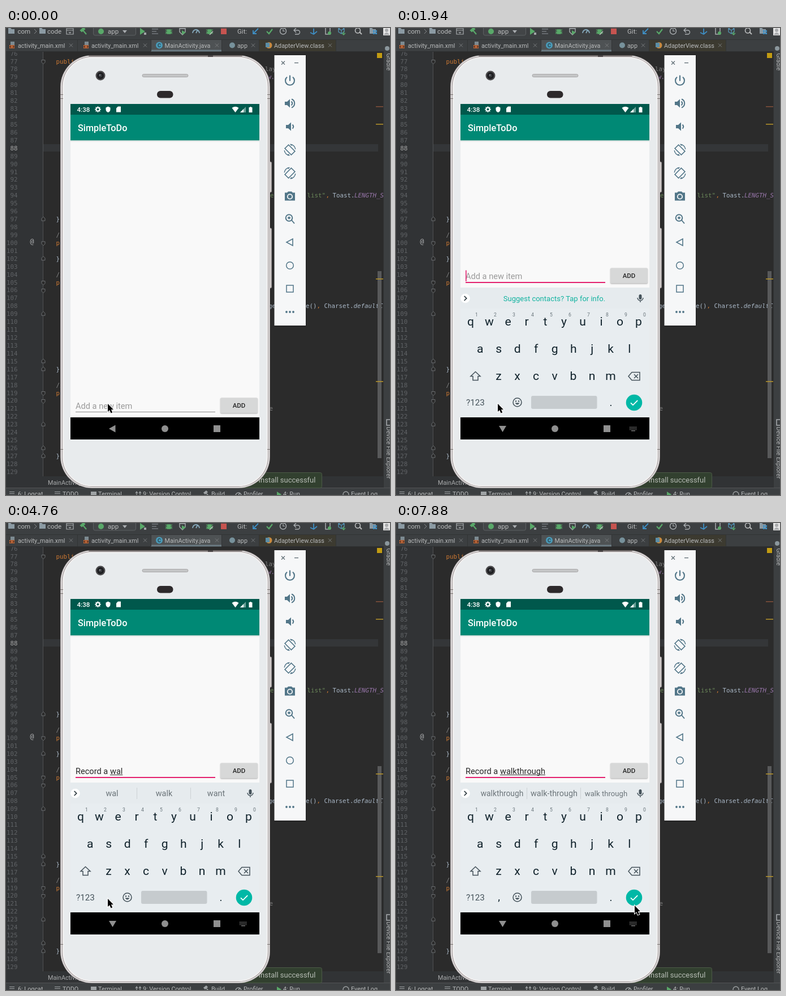
An HTML page with a canvas that plays this animation: 679x824 px, repeating every 8 s.

```html
<!DOCTYPE html>
<html lang="en">
<head>
<meta charset="utf-8">
<title>To-do app in an emulator</title>
<style>
html, body { margin: 0; width: 100%; height: 100%; overflow: hidden; background: #2b2b2b; }
canvas { display: block; }
</style>
</head>
<body>
<canvas id="stage" width="679" height="824"></canvas>
<script>
const W = 679, H = 824, LOOP = 8000;
const SANS = 'Roboto, sans-serif', MONO = '"DejaVu Sans Mono", monospace';
const PINK = '#e3226f', TEAL = '#00b8a6';
const stage = document.getElementById('stage').getContext('2d');
let g = stage;

// ---------- helpers ----------
function layer() {
  const c = document.createElement('canvas');
  c.width = W; c.height = H;
  return c.getContext('2d');
}
function onLayer(target, draw) {
  const prev = g;
  g = target;
  draw();
  g = prev;
}
function rect(x, y, w, h, color) {
  g.fillStyle = color;
  g.fillRect(x, y, w, h);
}
function round(x, y, w, h, r, fill, stroke, lw = 1) {
  g.beginPath();
  g.roundRect(x, y, w, h, r);
  if (fill) { g.fillStyle = fill; g.fill(); }
  if (stroke) { g.strokeStyle = stroke; g.lineWidth = lw; g.stroke(); }
}
function disc(x, y, r, fill, stroke, lw = 1) {
  g.beginPath();
  g.arc(x, y, r, 0, 7);
  if (fill) { g.fillStyle = fill; g.fill(); }
  if (stroke) { g.strokeStyle = stroke; g.lineWidth = lw; g.stroke(); }
}
// Path given relative to (x, y)
function shape(x, y, d, fill, stroke, lw = 1.5, turn = 0) {
  const p = new Path2D(d);
  g.save();
  g.translate(x, y);
  g.rotate(turn);
  if (fill) { g.fillStyle = fill; g.fill(p); }
  if (stroke) { g.strokeStyle = stroke; g.lineWidth = lw; g.stroke(p); }
  g.restore();
}
function text(s, x, y, size, color, align = 'left', style = '', family = SANS) {
  g.font = `${style} ${size}px ${family}`;
  g.textAlign = align;
  g.fillStyle = color;
  g.fillText(s, x, y);
}
function code(s, x, line, color, style = '') {
  text(s, x, lineY(line), 10.8, color, 'left', style, MONO);
}
const lineY = n => 62.5 + (n - 77) * 13.93;

// ---------- editor ----------
function drawEditor() {
  rect(0, 0, W, H, '#2b2b2b');
  rect(0, 41, 66, 750, '#313335');
  rect(66, 205, 592, 13, '#343638');
  rect(65, 41, 1, 750, '#505254');
  for (let n = 76; n <= 129; n++)
    text(n, 20.5, lineY(n), 10.8, n === 88 ? '#a9a9a9' : '#606366', 'right', '', MONO);
  text('@', 46, lineY(100) - 1.5, 11.6, '#b5b7b8', 'center', '', MONO);

  const opens = [77, 100, 105, 106, 119, 120], closes = [97, 102, 109, 115, 116, 123, 126, 127];
  for (const n of opens) shape(66, lineY(n) - 3, 'M-3-3H3V1L0 4L-3 1Z', '#2b2b2b', '#6b6e70', 1);
  for (const n of closes) shape(66, lineY(n) - 4, 'M-3 3H3V-1L0-4L-3-1Z', '#2b2b2b', '#6b6e70', 1);

  const plain = '#a9b7c6', key = '#cc7832', str = '#6a8759', field = '#9876aa';
  code('publi', 88.5, 77, key);
  for (const n of [97, 102, 116, 127]) code('}', 88.5, n, plain);
  for (const n of [99, 104, 118]) code('//', 88.5, n, '#808080');
  for (const n of [100, 105, 119]) code('p', 88.5, n, key);
  code('lay', 458, 78, '#808080');
  code('ew.', 456, 79, field, 'italic');
  code('e', 467, 94, str);
  code('list"', 532.5, 94, str);
  code(',', 565.5, 94, key);
  code('Toast.', 577.5, 94, plain);
  code('LENGTH_S', 616, 94, field, 'italic');
  code('ge', 464, 108, plain);
  code('e()', 530, 108, plain);
  code(',', 549.5, 108, key);
  code('Charset.', 562.5, 108, plain);
  code('defaultC', 614.5, 108, plain, 'italic');
  code('e', 465.5, 121, '#808080');

  rect(657, 429, 7, 330, '#58595a');
  rect(656, 44, 9, 9, '#c29b12');
  rect(654, 138, 13, 1.5, '#84513a');
  for (const y of [169, 442, 623]) rect(654, y, 13, 1.5, '#b8952a');
}

function drawTabs() {
  const ink = '#b9bbbc';
  rect(0, 0, W, 41, '#3c3f41');
  rect(0, 20, W, 1, '#323435');
  rect(256, 21, 125, 20, '#4e5254');
  rect(447, 21, 136, 20, '#3c3a30');
  rect(0, 41, W, 1, '#2e3031');
  rect(256, 38.5, 125, 3, '#6a7a82');
  const tabs = [['activity_main.xml', 21, 115], ['activity_main.xml', 151, 246], ['MainActivity.java', 280.5, 373],
    ['app', 409, 437], ['AdapterView.class', 474, 573]];
  for (const [name, x, close] of tabs) {
    text(name, x, 34.5, 10.8, ink);
    shape(close, 30.5, 'M-3-3L3 3M3-3L-3 3', null, '#797c7e', 1);
  }
  for (const x of [126, 256, 381, 447, 583]) rect(x, 21, 1, 20, '#323435');
  for (const x of [11, 142]) {
    shape(x, 30, 'M-3-6H4V2H-3Z', '#7c8a91');
    rect(x - 5, 30, 9, 6, '#c0683a');
    shape(x, 33, 'M-2-2L-4 0L-2 2M1-2L3 0L1 2', null, '#4b2c1c', 1.1);
  }
  disc(271, 30.5, 6, '#4a9ab8');
  text('C', 271, 34, 9, '#26404b', 'center', 'bold');
  disc(400, 30.5, 5, '#77919b');
  disc(465, 30.5, 5.5, '#c58a42');
  shape(463, 30, 'M-4-4H3V4H-4Z', '#5b8ea6');
}

function drawToolbar() {
  const ink = '#bbbdbe', green = '#59a869', blue = '#3f8fc4', grey = '#a9adb0';
  const folder = 'M-5-5H-1L1-3H6V5H-5Z';
  const check = 'M-5 0L-1 4L5-4', bug = 'M-3-3H3V4H-3ZM-6-3L6 4M6-3L-6 4M-6 1H6';
  shape(9, 5, folder, '#8b9aa3');
  text('com', 20.5, 9.5, 11.5, ink);
  shape(52, 6, 'M-2-4L2 0L-2 4', null, '#888b8d', 1);
  shape(64, 5, folder, '#8b9aa3');
  text('code', 73, 9.5, 11.5, ink);
  shape(113, 6, 'M-6-5H6V5H-6ZM-6-2H6M-2 1L0 3L2 1', null, grey, 1.2);
  shape(137, 6, 'M-5-2L0-6L2-4L-3 0ZM-1-2L5 5', green, green, 2.2);
  round(154.5, -6, 75, 19, 3, '#424547', '#5d6062');
  disc(168, 6, 5, green);
  text('app', 180, 9.5, 11.5, ink);
  shape(210, 6, 'M-4-2H4L0 3Z', grey);
  shape(241, 6, 'M-4-6L5 0L-4 6Z', green);
  rect(244, 8, 4, 4, '#a2a5a7');
  shape(264, 6, 'M-6-4H5M-6 0H2M-6 4H5', null, '#747a7d', 1.6);
  shape(288, 6, bug, green, green, 1.3);
  shape(312, 6, 'M-5-5H5V1L0 6L-5 1Z', null, grey, 1.4);
  shape(314, 8, 'M-3-4L4 0L-3 4Z', green);
  shape(336, 6, 'M-6 3A6 6 0 1 1 6 3M0 3L3-3', null, '#86a9bb', 1.8);
  shape(360, 6, bug, green, green, 1.3);
  shape(363, 9, 'M-3 3L3-3', null, ink, 1.5);
  rect(380, 1, 10, 10, '#c75450');
  text('Git:', 409, 9.5, 11.5, ink);
  shape(441, 6, 'M5-5L-4 4M-4-2V4H2', null, blue, 1.8);
  shape(466, 6, check, null, green, 2.2);
  disc(490, 5.5, 5.5, null, grey, 1.4);
  shape(490, 5.5, 'M0-4V0H3', null, grey, 1.2);
  shape(514, 6, 'M-5-2H2A3.5 3.5 0 0 1 2 5H-3M-1-6L-5-2L-1 2', null, grey, 1.4);
  shape(544, 6, 'M-6 2L0 5L6 0M0-5V5', null, blue, 1.8);
  shape(569, 5, 'M-4-6H4V6H-4Z', null, grey, 1.5);
  disc(572, 9, 3, green);
  shape(593, 4, 'M-5-3L0-6L5-3V3L0 6L-5 3ZM-5-3L0 0L5-3M0 0V6', null, '#5698bb', 1.2);
  shape(597, 9, 'M0-3V3M-3 0L0 3L3 0', null, green, 1.4);
  disc(622, 4.5, 4.5, null, ink, 1.6);
  shape(628, 10, 'M-3-3L1 1', null, ink, 2);
  shape(648, 5, folder, '#8b9aa3');
  for (const x of [649, 653]) for (const y of [4, 8]) rect(x, y, 3, 3, '#3f8fc4');
  rect(667, 0, 12, 13, '#e4e4e4');
  disc(673, 4, 3, '#a9abad');
  shape(673, 12, 'M-5 0Q0-8 5 0Z', '#a9abad');
}

function sideLabel(s, y) {
  g.save();
  g.translate(672.5, y);
  g.rotate(Math.PI / 2);
  text(s, 0, 0, 10.6, '#b5b7b8');
  g.restore();
}

function drawBars() {
  rect(667, 41, 12, H - 41, '#3c3f41');
  rect(667, 41, 1, H - 41, '#303233');
  disc(674, 36, 4, '#8b979d');
  sideLabel('Gradle', 44.5);
  shape(676, 696, 'M-3-5H4V5H-3Z', null, '#a9adb0');
  sideLabel('Device File Explorer', 703.5);

  rect(0, 791, 667, 21, '#313335');
  text('MainActivity', 74, 806, 10.8, '#a9abac');
  rect(0, 812, W, 12, '#3c3f41');
  rect(0, 811, W, 1, '#515355');
  const labels = [['6: Logcat', 21], ['TODO', 100], ['Terminal', 163], ['9: Version Control', 242],
    ['Build', 363], ['Profiler', 420], ['4: Run', 490], ['Event Log', 610]];
  for (const [s, x] of labels) text(s, x, 825.5, 10.8, '#b8babb');
  for (const y of [818, 821, 824]) {
    rect(6, y, 9, 1, '#9fa3a5');
    rect(86, y, 10, 1, '#9fa3a5');
  }
  rect(150, 818, 10, 6, '#9fa3a5');
  shape(234, 822, 'M-3-4V3M-5-1L-3-4L-1-1M3-4V3M1-1L3-4L5-1', null, '#9fa3a5', 1.2);
  shape(354, 821, 'M-4-1L0-4L2-2L-2 1ZM0 0L4 4', '#9fa3a5', '#9fa3a5');
  shape(411, 824, 'M-5 1A5 5 0 0 1 5 1M0 0L3-4', null, '#9fa3a5');
  shape(483, 822, 'M-4-4L4 1L-4 6Z', '#59a869');
  disc(601, 823, 5, null, '#9fa3a5', 1.3);

  round(380, 784.5, 178.5, 27, 3, '#32402f', '#4c5b47');
  text('Install successful', 446.5, 801.5, 13, '#b7bcb5');
}

// ---------- phone ----------
function drawPhone() {
  for (const [y, h] of [[236, 54], [353, 106]]) round(463, y, 6.5, h, 2, '#dcd6d5', '#8c8788');
  const rims = ['#a09a9b', '#efecec', '#8f898a', '#dcd7d7', '#f3f2f2', '#e8ebed'];
  const insets = [0, 1, 2.6, 3.5, 4.6, 6.5];
  rims.forEach((color, i) => {
    const d = insets[i];
    round(96 + d, 48 + d * .8, 371 - 2 * d, 764 - 1.6 * d, 56 - d, color);
  });
  round(146, 48, 272, 2, 1, '#77706f');
  rect(357, 48, 9, 3, '#4b4647');
  for (const x of [96, 462]) for (const y of [117, 124, 743]) rect(x, y, 5, 1, '#77716f');
  disc(167, 84, 8.5, '#4b4a4c');
  disc(167, 84, 6, '#1b1b1e');
  disc(167, 84, 3.2, '#37383c');
  disc(166, 83, 1.3, '#84868b');
  round(241, 81.5, 81, 5, 2.5, '#c4c5c6', '#aaa9aa');
  round(267, 111, 28.5, 12.5, 6, '#2d292b');
  rect(114, 134, 334, 592, '#f9f9f9');
}

function drawAppBar() {
  rect(114, 134, 334, 19, '#00584c');
  rect(114, 153, 334, 45.5, '#008975');
  rect(114, 198.5, 334, 1, '#cfd3d2');
  rect(114, 199.5, 334, 1.5, '#eeefef');
  text('4:38', 125.5, 148, 11.6, '#fff', 'left', '500');
  disc(162.5, 143.5, 3, null, '#fff', 2);
  for (let i = 0; i < 8; i++) shape(162.5, 143.5, 'M0-3V-5.3', null, '#fff', 1.6, i * Math.PI / 4);
  shape(180.5, 143.5, 'M0-5L4-3V0Q4 4 0 5.5Q-4 4-4 0V-3Z', '#fff');
  shape(199, 143.5, 'M-1-5H4V5H-4V-2Z', '#fff');
  shape(405.5, 144, 'M-6-3Q0-7.5 6-3L0 5Z', '#fff');
  shape(419, 144, 'M5-5V5H-5Z', '#6fa39b');
  shape(419, 144, 'M1-1V5H-5Z', '#fff');
  shape(432.5, 144, 'M-3-4H-1.2V-5H1.2V-4H3V5H-3Z', '#fff');
  text('SimpleToDo', 127, 182.4, 16.24, '#fff', 'left', '500');
}

function drawEmulatorBar() {
  const ink = '#527688', dark = '#5d6b73';
  g.save();
  g.shadowColor = 'rgba(0,0,0,.5)';
  g.shadowBlur = 3;
  rect(474.5, 48, 55.5, 477, '#f6f7f8');
  g.restore();
  shape(490, 61.5, 'M-3-3L3 3M3-3L-3 3', null, dark, 1.2);
  shape(513.5, 61.5, 'M-3.5 0H3.5', null, dark, 1.3);
  const x = 502;
  shape(x, 92.5, 'M-5-6A8 8 0 1 0 5-6M0-9V1', null, ink, 2.1);
  const horn = 'M-9-3H-5L0-7.5V7.5L-5 3H-9Z';
  shape(x, 133, horn, ink);
  shape(x, 133, 'M2.5-3.5Q6 0 2.5 3.5M3-7.5A8 8 0 0 1 3 7.5', null, ink, 2);
  shape(x + 2, 174, horn, ink);
  shape(x + 2, 174, 'M2.5-3.5Q6 0 2.5 3.5', null, ink, 2);
  for (const [y, flip] of [[215, 1], [256, -1]]) {
    g.save();
    g.translate(x, y);
    g.scale(flip, 1);
    shape(0, 0, 'M-8-4.6H8V4.6H-8Z', null, ink, 1.6, Math.PI / 4);
    shape(0, 0, 'M1-9.8A10 10 0 0 1 9.8-1M-1 9.8A10 10 0 0 1-9.8 1', null, ink, 1.5);
    shape(0, 0, 'M-.5-10.4L4.3-8.6L2.8-7ZM.5 10.4L-4.3 8.6L-2.8 7Z', ink);
    g.restore();
  }
  shape(x, 296.5, 'M-9-6H-5L-3-8H3L5-6H9V8H-9Z', ink);
  disc(x, 297.5, 4.2, ink, '#f6f7f8', 1.8);
  disc(x - 1.5, 335, 5.8, null, ink, 2);
  shape(x, 337, 'M3 2L8 8M-4-2H1M-1.5-4.5V.5', null, ink, 1.9);
  shape(x, 378, 'M5-6V6L-6 0Z', null, ink, 1.6);
  disc(x, 419, 6.3, null, ink, 1.5);
  shape(x, 460, 'M-6-6H6V6H-6Z', null, ink, 1.5);
  for (const d of [-6, 0, 6]) disc(x + d, 501, 1.9, ink);
}

// ---------- live screen ----------
function drawField(up, focused, typed, caret) {
  const y = up ? 437 : 666;
  g.save();
  g.shadowColor = 'rgba(0,0,0,.3)';
  g.shadowBlur = 2;
  g.shadowOffsetY = 1;
  round(379, y - 13.5, 66, 27, 2, '#d7d8d8');
  g.restore();
  text('ADD', 412, y + 4, 11.5, '#262626', 'center', '500');
  if (focused) rect(123, y + 11, 247, 2, PINK);
  else rect(123, y + 11, 247, 1, '#8b8b8b');
  text(typed || 'Add a new item', 123, y + 5.5, 14.6, typed ? '#262626' : '#9a9a9a');
  let end = 123;
  if (typed) {
    const start = 123 + g.measureText(typed.slice(0, typed.lastIndexOf(' ') + 1)).width;
    end += g.measureText(typed).width;
    rect(start, y + 7, end - start, 1, '#333');
  }
  if (caret) rect(Math.round(end), y - 9.5, 1.6, 19.5, PINK);
}

function drawNav(keyboard) {
  const ink = '#8f8f8f';
  rect(114, 687, 334, 39, '#000');
  shape(188, 707, keyboard ? 'M-6-5H7L.5 6Z' : 'M5.5-6.5V6.5L-6 0Z', ink);
  disc(281, 707, 6, ink);
  rect(367, 701, 12, 12, ink);
  if (!keyboard) return;
  for (let r = 0; r < 3; r++)
    for (let c = 0; c < 6; c++) rect(413 + c * 2.2, 703.5 + r * 2.2, 1.3, 1.3, '#777');
  rect(416, 710, 7, 1.4, '#777');
}

function drawSuggestions(list) {
  if (!list) {
    text('Suggest contacts? Tap for info.', 280, 481.7, 13, '#12b3a0', 'center');
    return;
  }
  rect(231, 467, 1, 20, '#cdd2d5');
  rect(326, 467, 1, 20, '#cdd2d5');
  list.split('|').forEach((word, i) => {
    const size = 14.4, room = i === 1 ? 84 : 75.5;
    g.font = `${size}px ${SANS}`;
    const fit = Math.min(1, room / g.measureText(word).width);
    text(word, 187.5 + 92 * i, 482, size * fit, '#6c757a', 'center');
  });
}

function drawKeyboard(list) {
  const ink = '#10222b', soft = '#44525a';
  rect(114, 458, 334, 229, '#e8edf0');
  rect(114, 458, 334, 37, '#e6ebee');
  disc(122.5, 477, 8.3, '#fff');
  shape(122.5, 477, 'M-1.8-4L2.2 0L-1.8 4', null, '#263238', 1.7);
  drawSuggestions(list);
  round(429.5, 470, 5, 9, 2.5, soft);
  shape(432, 477, 'M-5-1A5 5 0 0 0 5-1M0 4V7', null, soft, 1.4);

  const row = (keys, x, y) => [...keys].forEach((k, i) => text(k, x + i * 33, y, 21.1, ink, 'center'));
  row('qwertyuiop', 132, 524.5);
  row('asdfghjkl', 148.7, 572.5);
  row('zxcvbnm', 181.5, 620.5);
  [...'1234567890'].forEach((n, i) => text(n, 142.5 + i * 33, 509, 8.6, '#68747a', 'center'));
  shape(140.5, 614.5, 'M0-8L8.5 0H4.5V7H-4.5V0H-8.5Z', null, soft, 1.5);
  shape(421, 614.5, 'M-4-7H10V7H-4L-10 0ZM0-3.5L7 3.5M7-3.5L0 3.5', null, soft, 1.5);
  text('?123', 140.5, 666, 15.2, soft, 'center');
  text(',', 182, 666, 19, ink, 'center');
  text('.', 380, 667, 19, ink, 'center');
  disc(214.5, 660.5, 7.5, null, soft, 1.5);
  disc(212, 658.5, 1.2, soft);
  disc(217, 658.5, 1.2, soft);
  shape(214.5, 661.5, 'M-4 0Q0 6 4 0Z', soft);
  round(239, 649, 116.5, 23, 3, '#c6cbce');
  disc(421, 661, 14.3, TEAL);
  shape(421, 661, 'M-6 .3L-2 4.3L6.2-3.9', null, '#fff', 1.8);
}

function drawPointer(x, y) {
  shape(x, y, 'M0 0V14L3.2 11.2L5.5 16.5L8.2 15.4L5.9 10.2H10Z', null, '#fff', 2);
  shape(x, y, 'M0 0V14L3.2 11.2L5.5 16.5L8.2 15.4L5.9 10.2H10Z', '#000');
}

// ---------- timeline ----------
// time, typed text, caret shown, suggestions
const typing = [
  [0, '', 0], [600, '', 1], [1490, '', 0], [1940, '', 1], [2230, 'R', 1], [2380, 'Re', 1],
  [2830, 'Rec', 1, 'Rec|Record|Recommend'],
  [2970, 'Reco', 1, 'Reco|Record|Recommend'],
  [3120, 'Recor', 1, 'Recor|Record|Records'],
  [3270, 'Record', 1, 'Record|Records|Recorded'],
  [3420, 'Record a', 1, 'a|and|an'],
  [3570, 'Record a w', 1, 'w|while|week'],
  [4170, 'Record a wa', 1, 'wa|was|want'],
  [4310, 'Record a wal', 1, 'wal|walk|want'],
  [4760, 'Record a wal', 0, 'wal|walk|want'],
  [5060, 'Record a wall', 1, 'wall|call|want'],
  [5350, 'Record a wal', 1, 'wall|call|want'],
  [5500, 'Record a wal', 1, 'wal|walk|wallet'],
  [5650, 'Record a wall', 1, 'wall|call|wallet'],
  [6100, 'Record a wall', 0, 'wall|call|wallet'],
  [6250, 'Record a wal', 1, 'wal|walk|wallet'],
  [6390, 'Record a walk', 1, 'walk|walking|walked'],
  [6540, 'Record a walkt', 1, 'walkt|walk|walked'],
  [6690, 'Record a walkthr', 1, 'walkthr|walk-through|walkthrough'],
  [6840, 'Record a walkthrou', 1, 'walkthrou|walk-through|walkthrough'],
  [6990, 'Record a walkthroug', 1, 'walkthroug|walk-through|walkthrough'],
  [7140, 'Record a walkthrough', 1, 'walkthrough|walk-through|walk through'],
  [7590, 'Record a walkthrough', 0, 'walkthrough|walk-through|walk through']
];
// time, keyboard opacity, keyboard offset
const sliding = [[0, 0, 0], [900, .15, 26], [1040, .73, 21], [1190, 1, 0]];
const pointing = [[0, 180, 663], [7440, 205, 683], [7590, 325, 716], [7740, 402, 720], [7880, 422, 675]];
const at = (track, t) => track.findLast(step => step[0] <= t);

const back = layer(), keys = layer();
onLayer(back, () => {
  drawEditor();
  drawTabs();
  drawToolbar();
  drawBars();
  drawPhone();
  drawAppBar();
  drawEmulatorBar();
});

function render(t) {
  const [, typed, caret, list] = at(typing, t);
  const [, alpha, offset] = at(sliding, t);
  const [, px, py] = at(pointing, t);
  g.drawImage(back.canvas, 0, 0);
  drawField(alpha > 0, t >= 600, typed, caret);
  drawNav(alpha > 0);
  if (alpha) {
    onLayer(keys, () => drawKeyboard(list));
    g.globalAlpha = alpha;
    g.drawImage(keys.canvas, 0, offset);
    g.globalAlpha = 1;
  }
  drawPointer(px, py);
}

const begin = performance.now();
function tick() {
  render((performance.now() - begin) % LOOP);
  requestAnimationFrame(tick);
}
tick();
</script>
</body>
</html>
```
